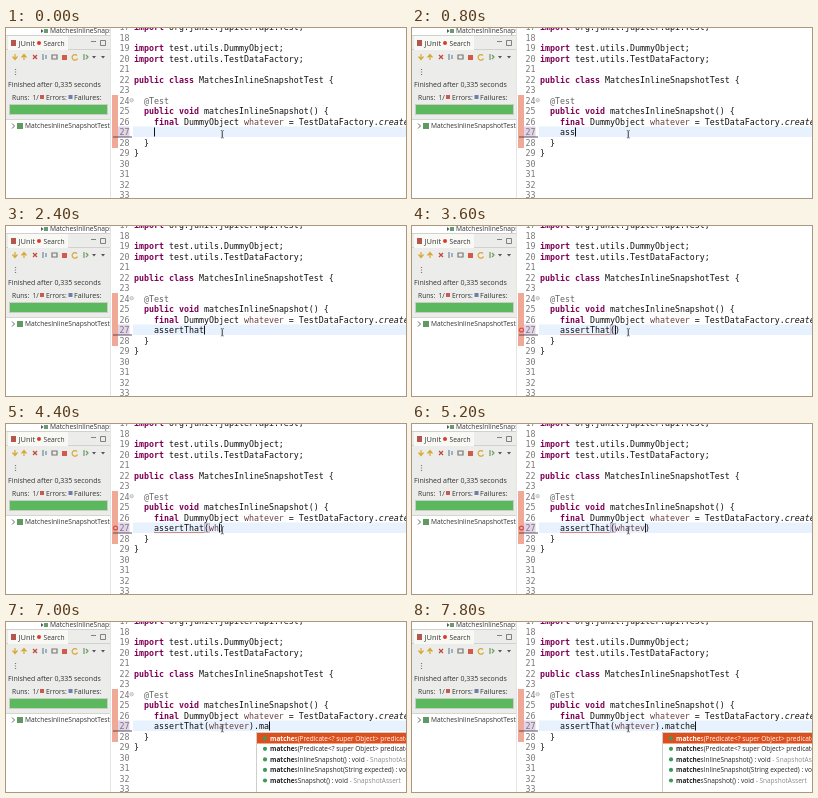
These frames come from a looping animation (400 px wide and 170 px high, 8 s). An HTML page:

```html
<!DOCTYPE html>
<html lang="en">
<head>
<meta charset="utf-8">
<title>Typing an assertion</title>
<style>
  html, body { margin: 0; width: 100%; height: 100%; overflow: hidden; background: #fff; }
  svg { display: block; width: 100vw; height: 100vh; }
  text { white-space: pre; }
  .ui { font-family: "Open Sans", sans-serif; font-size: 6.7px; fill: #333; }
  .code { font-family: "DejaVu Sans Mono", monospace; font-size: 8.306px; fill: #111; }
  .num { fill: #787878; text-anchor: end; }
  .kw { fill: #7f0055; font-weight: bold; }
  .var { fill: #6a3e3e; }
  .note { fill: #646464; }
  .static { font-style: italic; }
  .dim { fill: #888; }
  .b { font-weight: bold; }
</style>
</head>
<body>
<svg viewBox="0 0 400 170" preserveAspectRatio="none">
  <defs>
    <clipPath id="side"><rect width="104" height="170"/></clipPath>
  </defs>

  <g clip-path="url(#side)">
    <rect width="104" height="91" fill="#ececea"/>
    <rect width="104" height="7" fill="#fff"/>
    <path d="M0 7.5H104M0 21.5H104" stroke="#d2d2cc"/>
    <rect x="2" y="8" width="60" height="14" fill="#f8f8f5"/>
    <path d="M35 1l2.5 2-2.5 2z" fill="#555"/>
    <rect x="38" y="1" width="4" height="4" fill="#6a9a72"/>
    <text class="ui" x="44" y="5">MatchesInlineSnapshotTest</text>

    <rect x="5" y="12" width="5" height="6" fill="#b5564c"/>
    <text class="ui" x="12.5" y="17.6" style="font-size:7.5px">JUnit</text>
    <circle cx="33" cy="15" r="2" fill="#dc3a2c"/>
    <text class="ui" x="37.5" y="17.6">Search</text>
    <path d="M85 13.5h5M94.5 12.5h5v5h-5z" fill="none" stroke="#666" stroke-width=".8"/>

    <g fill="none" stroke-width="1.2">
      <path d="M9 26v5m-2.5-2.5L9 31.500l2.500-3M18 32v-5m-2.500 2.500L18 26.500l2.500 3" stroke="#d8a832"/>
      <path d="M27 27l4 4m0-4l-4 4" stroke="#c0483c"/>
      <path d="M37 26v6m3-5v4" stroke="#708a9c"/>
      <path d="M46 27h5v4h-5z" stroke="#777"/>
      <path d="M71 27.500a2.800 2.800 0 1 0 .5 3" stroke="#d8a832"/>
      <path d="M78 26v6m2-5l2 2-2 2" stroke="#6c9b62"/>
    </g>
    <rect x="56" y="27" width="5" height="5" fill="#d45a48"/>
    <path d="M86 28h4l-2 2.500zM95 28h4l-2 2.500z" fill="#555"/>
    <path d="M9.500 41v1m0 1.500v1m0 1.500v1" stroke="#777" stroke-width="1.2"/>

    <text class="ui" x="2" y="59.400" style="font-size:7px">Finished after 0,335 seconds</text>
    <text class="ui" x="6" y="71.500">Runs:</text>
    <text class="ui" x="26.500" y="71.500">1/</text>
    <rect x="34" y="67" width="4" height="4" fill="#c85a50"/>
    <text class="ui" x="40" y="71.500">Errors:</text>
    <rect x="62.500" y="67" width="4" height="4" fill="#6b7fa8"/>
    <text class="ui" x="68" y="71.500" style="font-size:7.100px">Failures:</text>
    <rect x="3.500" y="76.500" width="98" height="10" fill="#5cb85c" stroke="#c9cec5"/>

    <path d="M0 91.500H104" stroke="#d6d6d0"/>
    <path d="M6 95.500l2.500 2.500L6 100.500" fill="none" stroke="#555" stroke-width=".9"/>
    <rect x="11" y="95" width="6" height="6" fill="#5f9a62"/>
    <text class="ui" x="19" y="100.400" style="font-size:6.650px">MatchesInlineSnapshotTest</text>
  </g>
  <path d="M104.500 0V170" stroke="#e4e4e0"/>

  <rect x="106" y="67" width="6" height="53" fill="#efa996"/>
  <rect x="112" y="98.500" width="11.500" height="10.500" fill="#e2d4ea"/>
  <path d="M107 109H126" stroke="#4a3a50" stroke-width=".9"/>
  <rect x="127" y="98.500" width="273" height="10.500" fill="#e8f2fe"/>
  <g id="lines"></g>
  <g fill="none" stroke="#999" stroke-width=".6">
    <circle cx="125.700" cy="72.200" r="1.700"/><path d="M124.700 72.200h2"/>
  </g>

  <g id="error">
    <circle cx="109.500" cy="104" r="2.600" fill="#d9534a"/>
    <path d="M108.500 103l2 2m0-2l-2 2" stroke="#fff" stroke-width=".7"/>
    <path d="M148 108.600h50" stroke="#b56a6a" stroke-width=".8"/>
  </g>
  <rect id="bracket" x="198.300" y="99.500" width="5" height="9" fill="#ddd6ec" stroke="#a9a0b8" stroke-width=".6"/>
  <text class="code" x="148" y="107"><tspan id="call"></tspan><tspan id="arg" class="var"></tspan><tspan id="rest"></tspan></text>
  <path id="caret" d="M0 99.500v9" stroke="#111" stroke-width="1"/>
  <path d="M214.800 102.500q1.500 0 1.500 1v5.500q0 1-1.500 1m3-7.500q-1.500 0-1.500 1v5.500q0 1 1.500 1" fill="none" stroke="#555" stroke-width=".8"/>

  <g id="popup">
    <rect x="250.500" y="110.500" width="160" height="70" fill="#fff" stroke="#cfcfca"/>
    <rect x="251" y="111" width="149" height="10.500" fill="#dd4f1c"/>
  </g>
</svg>

<script>
  const LOOP = 8000, STEP = 200, CHAR = 5, LINE = 10.5;
  const el = id => document.getElementById(id);
  const baseline = n => 107 + (n - 27) * LINE;
  const span = (cls, text) => `<tspan class="${cls}">${text}</tspan>`;
  const kw = text => span('kw', text);

  const source = {
    17: kw('import') + ' org.junit.jupiter.api.Test;',
    19: kw('import') + ' test.utils.DummyObject;',
    20: kw('import') + ' test.utils.TestDataFactory;',
    22: kw('public class') + ' MatchesInlineSnapshotTest {',
    24: '  ' + span('note', '@Test'),
    25: '  ' + kw('public void') + ' matchesInlineSnapshot() {',
    26: '    ' + kw('final') + ' DummyObject ' + span('var', 'whatever') +
        ' = TestDataFactory.' + span('static', 'createDummy') + '();',
    28: '  }',
    29: '}'
  };
  let markup = '';
  for (let n = 17; n <= 33; n++) {
    const y = baseline(n);
    markup += `<text class="code num" x="123.5" y="${y}">${n}</text>`;
    if (source[n]) markup += `<text class="code" x="128" y="${y}">${source[n]}</text>`;
  }
  el('lines').innerHTML = markup;

  const predicate = 's(Predicate&lt;? super Object&gt; predicate) : ObjectAssert';
  const origin = span('dim', ' - SnapshotAssert');
  const proposals = [
    predicate,
    predicate,
    'sInlineSnapshot() : void' + origin,
    'sInlineSnapshot(String expected) : void' + origin,
    'sSnapshot() : void' + origin
  ];
  el('popup').innerHTML += proposals.map((tail, i) => {
    const y = 116.3 + i * 10.55;
    return `<circle cx="259" cy="${y}" r="2.1" fill="#3f9a5a"/>
      <text class="ui" x="264" y="${y + 2.3}" style="font-size:6.5px;fill:${i ? '#222' : '#fff'}">${span('b', 'matche')}${tail}</text>`;
  }).join('');

  // Each run types one character per step, from its start time.
  const runs = [[400, 'assert'], [1800, 'That'], [3200, '('], [4200, 'whatever'], [6000, ')'], [6600, '.matche']];
  const OPENED = 3200, CLOSED = 6000;

  function typedAt(t) {
    let text = '', last = 0;
    for (const [start, chars] of runs) {
      if (t < start) break;
      const count = Math.min(chars.length, Math.floor((t - start) / STEP) + 1);
      text += chars.slice(0, count);
      last = start + (count - 1) * STEP;
    }
    return { text, last };
  }

  const show = (id, on) => el(id).style.display = on ? '' : 'none';

  function draw(now) {
    const t = Math.floor(now % LOOP / STEP) * STEP;
    const { text, last } = typedAt(t);
    const line = text + (t >= OPENED && t < CLOSED ? ')' : '');
    el('call').textContent = line.slice(0, 11);
    const end = line.indexOf(')');
    el('arg').textContent = end < 0 ? '' : line.slice(11, end);
    el('rest').textContent = end < 0 ? '' : line.slice(end);
    el('caret').setAttribute('transform', `translate(${148.5 + text.length * CHAR} 0)`);
    show('caret', Math.floor((t - last) / 600) % 2 === 0);
    show('bracket', t >= OPENED && t < 6600);
    show('error', t >= 3400 && t < 7000);
    show('popup', t >= 7000);
  }

  const begin = performance.now();
  function tick() {
    draw(performance.now() - begin);
    requestAnimationFrame(tick);
  }
  tick();
</script>
</body>
</html>
```
